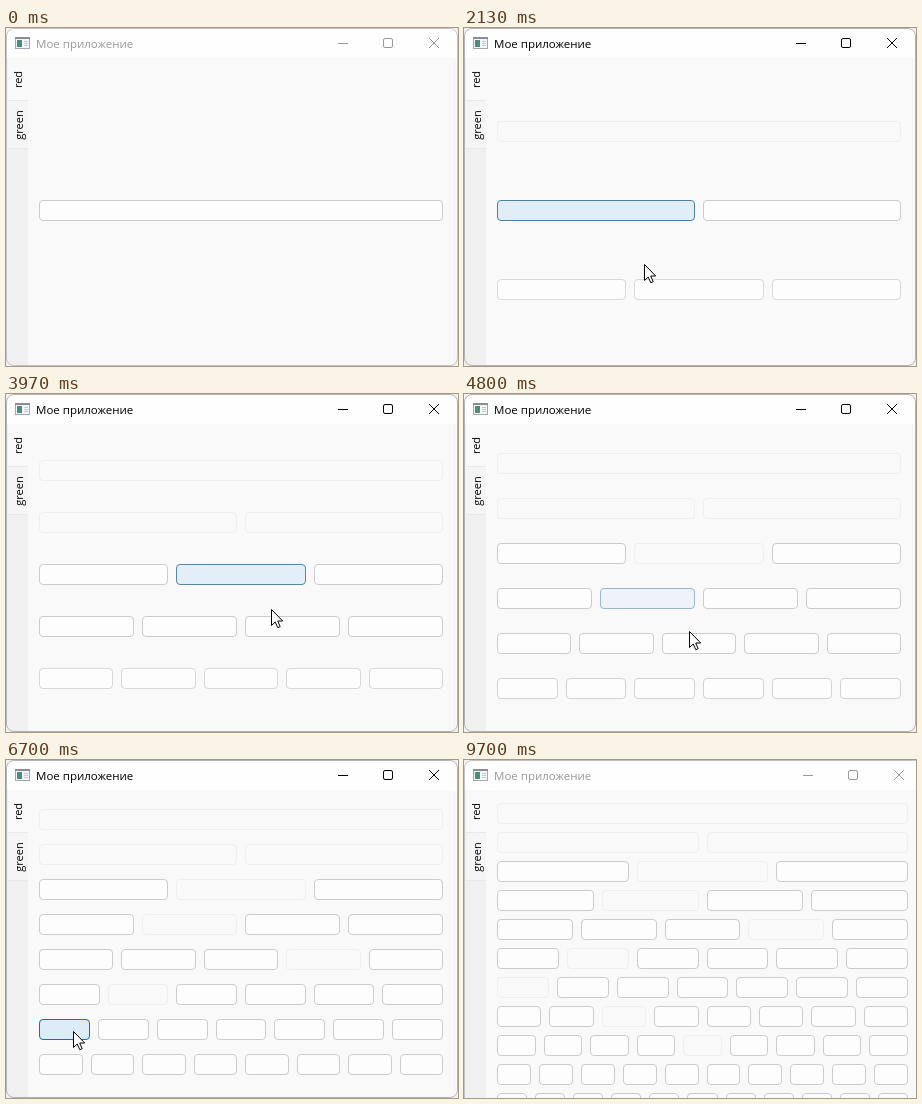
An HTML page that plays this animation: 452x338 px, repeating every 9.73 s.

```html
<!DOCTYPE html>
<html lang="ru">
<head>
<meta charset="utf-8">
<style>
html, body { margin: 0; width: 100%; height: 100%; overflow: hidden; background: #f1f1f1; }
svg { display: block; width: 452px; height: 338px; }
text { font-family: "Open Sans", "Noto Sans", sans-serif; }
.tab { font-size: 11px; text-anchor: middle; fill: #000; }
</style>
</head>
<body>
<svg viewBox="0 0 452 338">
  <clipPath id="frame"><rect id="shape" width="452" height="338" rx="8"/></clipPath>
  <g clip-path="url(#frame)">
    <rect width="460" height="370" fill="#f9f9f9"/>
    <rect width="460" height="30" fill="#fefefe"/>
    <rect y="30" width="2" height="340" fill="#f2f2f2"/>
    <rect x="2" y="72" width="20" height="49" fill="#f5f5f5"/>
    <path d="M2 72.5H22M2 120.5H22" stroke="#e9e9ec"/>
    <rect x="2" y="121" width="20" height="250" fill="#f0f0f0"/>
    <path id="edge" stroke="#f2f2f2"/>
  </g>
  <rect id="border" x=".5" y=".5" rx="7.5" fill="none"/>

  <rect x="9.5" y="9.5" width="14" height="11" fill="#f4f5f8" stroke="#a4a6ae"/>
  <path d="M9 10H24" stroke="#8a8d96" stroke-width="2"/>
  <rect x="11" y="12" width="5" height="7" fill="#4c8c78"/>
  <path d="M18 13.5H22M18 15.5H22M18 17.5H22" stroke="#c6c8d0"/>

  <text id="title" x="30" y="20" font-size="11.5">Мое приложение</text>
  <g id="controls" fill="none">
    <path d="M332 15.5H342"/>
    <rect x="377.5" y="10.5" width="9" height="9" rx="1.5"/>
    <path d="M423 10L433 20M433 10L423 20"/>
  </g>
  <text class="tab" transform="translate(16 51.5) rotate(-90)">red</text>
  <text class="tab" transform="translate(17 97) rotate(-90)">green</text>

  <g id="buttons"></g>
  <path id="cursor" d="M.5 .5V16.5L4.2 13L6.8 18.7L9.2 17.6L6.7 12H11.7Z" fill="#fff" stroke="#000"/>
</svg>
<script>
const LOOP = 9730, BLUR = 9670, FADE = 220, PRESS = 80;
const BTN_H = 21, GAP = 8, LEFT = 33, TOP = 35;

const $ = id => document.getElementById(id);
const set = (el, attrs) => { for (const k in attrs) el.setAttribute(k, attrs[k]); };
const clamp = v => Math.max(0, Math.min(1, v));
const mix = (a, b, k) => a + (b - a) * k;
const blend = (a, b, k) => a.map((c, i) => c.map((v, j) => mix(v, b[i][j], k)));
const rgb = c => `rgb(${c.map(Math.round)})`;

// fill, border
const normal = [[253, 253, 253], [204, 204, 208]];
const fresh = [[253, 253, 253], [218, 218, 224]];
const hover = [[220, 237, 247], [0, 120, 190]];
const pressed = [[222, 236, 247], [52, 112, 150]];
const disabled = [[249, 249, 249], [239, 239, 241]];

// Each click disables one button and adds a row; the tempo rises after the fourth
const clicks = [0, 0, 1, 1, 1, 3, 1, 0, 2, 4].map((col, i) => ({
  at: 1190 + 913 * Math.min(i, 3) + 750 * Math.max(0, i - 3),
  row: i < 2 ? i + 1 : i,
  col
}));

// The window widens once the last row no longer fits
const growth = rows => rows > 10 ? 7 : 0;

// Spare height is shared equally above, between and below the rows
function place(row, col, rows) {
  const gap = Math.max(GAP, Math.floor((295 - BTN_H * rows) / (rows + 1)));
  const size = (404 + growth(rows) - GAP * (row - 1)) / row;
  const left = LEFT + col * (size + GAP);
  const x = Math.round(left);
  return { x, y: TOP + gap + (row - 1) * (BTN_H + gap), w: Math.round(left + size) - x };
}

// The pointer rests on every clicked button, with a few points in between
const path = [
  [30, 340, 338], [5570, 272, 247], [8130, 218, 269], [9070, 244, 270], [9370, 330, 340],
  ...clicks.flatMap(({ at, row, col }, i) => {
    const b = place(row, col, i + 1);
    const x = b.x + .77 * b.w - 5, y = b.y + 12;
    return [[at - 230, x, y], [at + 45, x, y]];
  })
].sort((a, b) => a[0] - b[0]);

function pointer(t) {
  const i = path.findIndex(p => p[0] > t);
  if (i < 1) return null;
  const [t0, x0, y0] = path[i - 1], [t1, x1, y1] = path[i];
  const k = (t - t0) / (t1 - t0);
  return { x: Math.round(mix(x0, x1, k)), y: Math.round(mix(y0, y1, k)) };
}

const buttons = [];
for (let row = 1; row <= clicks.length + 1; row++) {
  for (let col = 0; col < row; col++) {
    const el = document.createElementNS("http://www.w3.org/2000/svg", "rect");
    set(el, { rx: 3.5, height: BTN_H - 1 });
    $("buttons").append(el);
    const hit = clicks.find(c => c.row === row && c.col === col)?.at ?? Infinity;
    const born = row > 1 ? clicks[row - 2].at : -FADE;
    buttons.push({ el, row, col, born, hit });
  }
}

function look(b, t, over) {
  if (t >= b.hit) return blend(pressed, disabled, clamp((t - b.hit) / FADE));
  if (t >= b.hit - PRESS) return pressed;
  if (over) return hover;
  return blend(fresh, normal, clamp((t - b.born) / FADE));
}

function drawWindow(t, grow) {
  const active = t >= clicks[0].at - PRESS && t < BLUR;
  const ink = active ? "#000" : "#999";
  const width = 452 + grow, height = 338 + (grow ? 29 : 0);
  set($("shape"), { width, height });
  set($("border"), { width: width - 1, height: height - 1, stroke: active ? "#b2b2ba" : "#c2c2c8" });
  set($("edge"), { d: `M${width - 3.5} 31V${height}` });
  set($("title"), { fill: ink });
  set($("controls"), { stroke: ink, transform: `translate(${grow})` });
}

function draw(t) {
  const rows = 1 + clicks.filter(c => c.at <= t).length;
  const p = pointer(t);
  drawWindow(t, growth(rows));

  for (const b of buttons) {
    b.el.style.display = b.row <= rows ? "" : "none";
    if (b.row > rows) continue;
    const { x, y, w } = place(b.row, b.col, rows);
    const over = p && p.x >= x && p.x < x + w && p.y >= y && p.y < y + BTN_H;
    const [fill, stroke] = look(b, t, over);
    set(b.el, { x: x + .5, y: y + .5, width: w - 1, fill: rgb(fill), stroke: rgb(stroke) });
  }

  $("cursor").style.display = p ? "" : "none";
  if (p) set($("cursor"), { transform: `translate(${p.x} ${p.y})` });
}

const start = performance.now();
function tick() {
  draw((performance.now() - start) % LOOP);
  requestAnimationFrame(tick);
}
tick();
</script>
</body>
</html>
```
